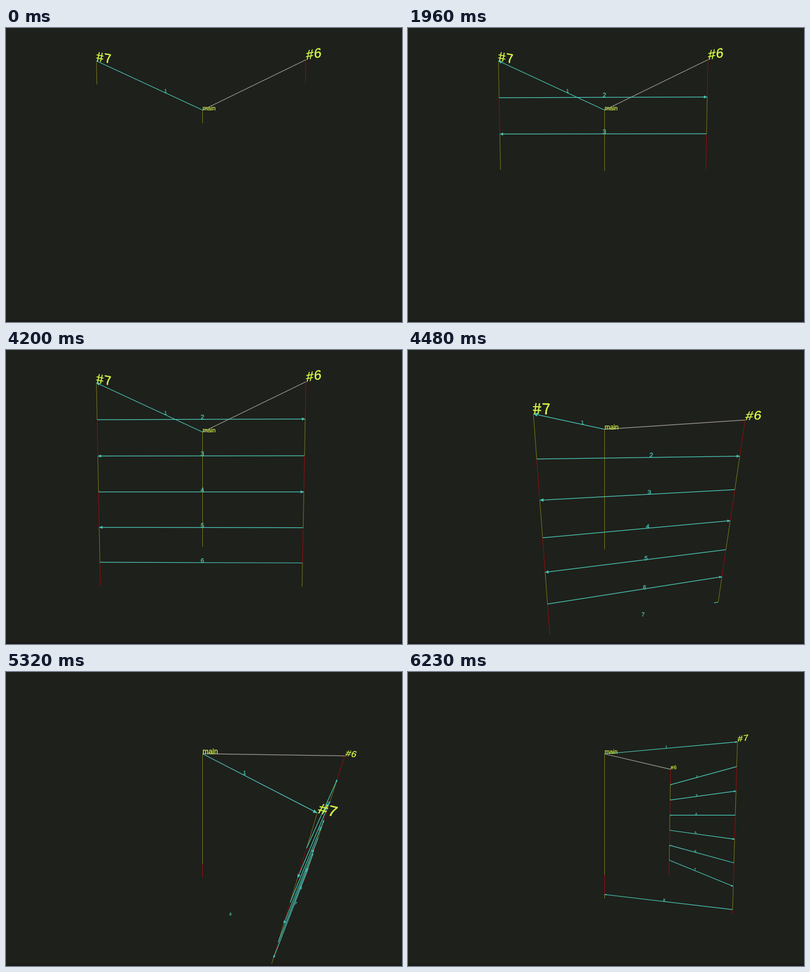
Write an HTML page with a canvas that moves like this. It is 692 px wide and 514 px high and loops after 6300 ms.

```html
<!DOCTYPE html>
<html lang="en">
<head>
<meta charset="utf-8">
<title>Message trace</title>
<style>
  html, body { margin: 0; width: 100%; height: 100%; overflow: hidden; background: #1e201b; }
  canvas { display: block; }
</style>
</head>
<body>
<canvas id="stage" width="692" height="514"></canvas>
<script>
const ctx = document.getElementById('stage').getContext('2d');
const LOOP = 6300, STEP = 70;
const CENTER_X = 343.5, CENTER_Y = 270.5, FOCAL = 400;
const TOP = 0.3135, TICK = 0.0878, RADIUS = 0.504;
const RUN = 0.54, HEAD_DELAY = 0.75;
const TEAL = '#4ac8b8', OLIVE = '#77781c', RED = '#960c10', GREY = '#a19b94', LIME = '#d9ff48';
const RAD = Math.PI / 180;

// Keys: [time, degrees]
const YAW = [[4200, 0], [4830, 32.4], [5320, 57.3], [6230, 101.8]];
const PITCH = [[4200, 2.45], [4830, 30.2], [5075, 33.5], [5320, 32], [5600, 20], [5850, 2.9]];

const main = { name: 'main', angle: 0, radius: 0, size: 10.4, spacing: 0, end: 7.2, color: k => k === 6 ? RED : OLIVE };
const seven = { name: '#7', angle: -30.6, radius: RADIUS, size: 11.4, spacing: 0.7, end: 7.2, color: k => k % 2 ? RED : OLIVE };
const six = { name: '#6', angle: 29.4, radius: RADIUS, size: 11.4, spacing: 0.7, end: 7.1, color: k => k % 2 && k < 6 ? OLIVE : RED };
const columns = [main, seven, six];

const messages = [[main, seven]];
for (let k = 1; k < 7; k++) messages.push(k % 2 ? [seven, six] : [six, seven]);
messages.push([seven, main]);

let yaw, sin, cos;

function sample(keys, t) {
  if (t <= keys[0][0]) return keys[0][1];
  for (let i = 1; i < keys.length; i++) {
    const [t0, a] = keys[i - 1], [t1, b] = keys[i];
    if (t <= t1) return a + (b - a) * (t - t0) / (t1 - t0);
  }
  return keys[keys.length - 1][1];
}

const mix = (p, q, f) => p.map((v, i) => v + (q[i] - v) * f);
const unit = p => { const n = Math.hypot(...p); return p.map(v => v / n); };

function place(column, tick) {
  const a = (column.angle + yaw) * RAD;
  return [column.radius * Math.sin(a), TOP - tick * TICK, column.radius * Math.cos(a)];
}

function project([x, y, z]) {
  const depth = 1 - z * cos - y * sin;
  return {
    x: CENTER_X + FOCAL * x / depth,
    y: CENTER_Y - FOCAL * (y * cos - z * sin) / depth,
    depth
  };
}

function line(p, q, color, width = 1) {
  const a = project(p), b = project(q);
  ctx.strokeStyle = color;
  ctx.lineWidth = width;
  ctx.beginPath();
  ctx.moveTo(a.x, a.y);
  ctx.lineTo(b.x, b.y);
  ctx.stroke();
}

// Text lies on a plane that faces the camera position
function label(text, p, size, color, spacing = 0) {
  const w = unit([-p[0], sin - p[1], cos - p[2]]);
  const u = unit([w[2], 0, -w[0]]);
  const v = [w[1] * u[2], w[2] * u[0] - w[0] * u[2], -w[1] * u[0]];
  const e = 0.01, s = e * FOCAL;
  const o = project(p);
  const [a, b] = [u, v].map(axis => project(p.map((c, i) => c + axis[i] * e)));
  ctx.save();
  ctx.transform((a.x - o.x) / s, (a.y - o.y) / s, (o.x - b.x) / s, (o.y - b.y) / s, o.x, o.y);
  ctx.font = size + 'px "Liberation Sans", Arial, sans-serif';
  ctx.letterSpacing = spacing + 'px';
  ctx.fillStyle = ctx.strokeStyle = color;
  ctx.lineWidth = 0.2;
  ctx.fillText(text, 0, 0);
  ctx.strokeText(text, 0, 0);
  ctx.restore();
}

function head(from, to) {
  const a = project(from), b = project(to);
  const length = 3.2 / b.depth, half = 1.5 / b.depth;
  ctx.save();
  ctx.translate(b.x, b.y);
  ctx.rotate(Math.atan2(b.y - a.y, b.x - a.x));
  ctx.fillStyle = TEAL;
  ctx.beginPath();
  ctx.moveTo(0, 0);
  ctx.lineTo(-length, -half);
  ctx.lineTo(-length, half);
  ctx.fill();
  ctx.restore();
}

function draw(t) {
  yaw = sample(YAW, t);
  const pitch = sample(PITCH, t) * RAD;
  sin = Math.sin(pitch);
  cos = Math.cos(pitch);
  const now = 0.64 + 0.0012 * t;

  ctx.fillStyle = '#1e201b';
  ctx.fillRect(0, 0, 692, 514);

  for (const column of columns) {
    const end = Math.min(now, column.end);
    for (let k = 0; k < end; k++) {
      line(place(column, k), place(column, Math.min(k + 1, end)), column.color(k));
    }
  }
  line(place(main, 0), place(six, 0), GREY, 1.2);

  messages.forEach(([source, target], k) => {
    const age = now - k;
    if (age < 0) return;
    const from = place(source, k), to = place(target, k);
    line(from, mix(from, to, Math.min(1, age / RUN)), TEAL, 1.2);
    if (age > HEAD_DELAY) head(from, to);
    label(k + 1, mix(from, to, 0.5), 6, TEAL);
  });

  for (const column of columns) {
    label(column.name, place(column, 0), column.size, LIME, column.spacing);
  }

  ctx.fillStyle = '#1b1b1a';
  ctx.fillRect(0, 510, 692, 4);
}

const start = performance.now();
function frame() {
  const t = (performance.now() - start) % LOOP;
  draw(Math.floor(t / STEP) * STEP);
  requestAnimationFrame(frame);
}
frame();
</script>
</body>
</html>
```
